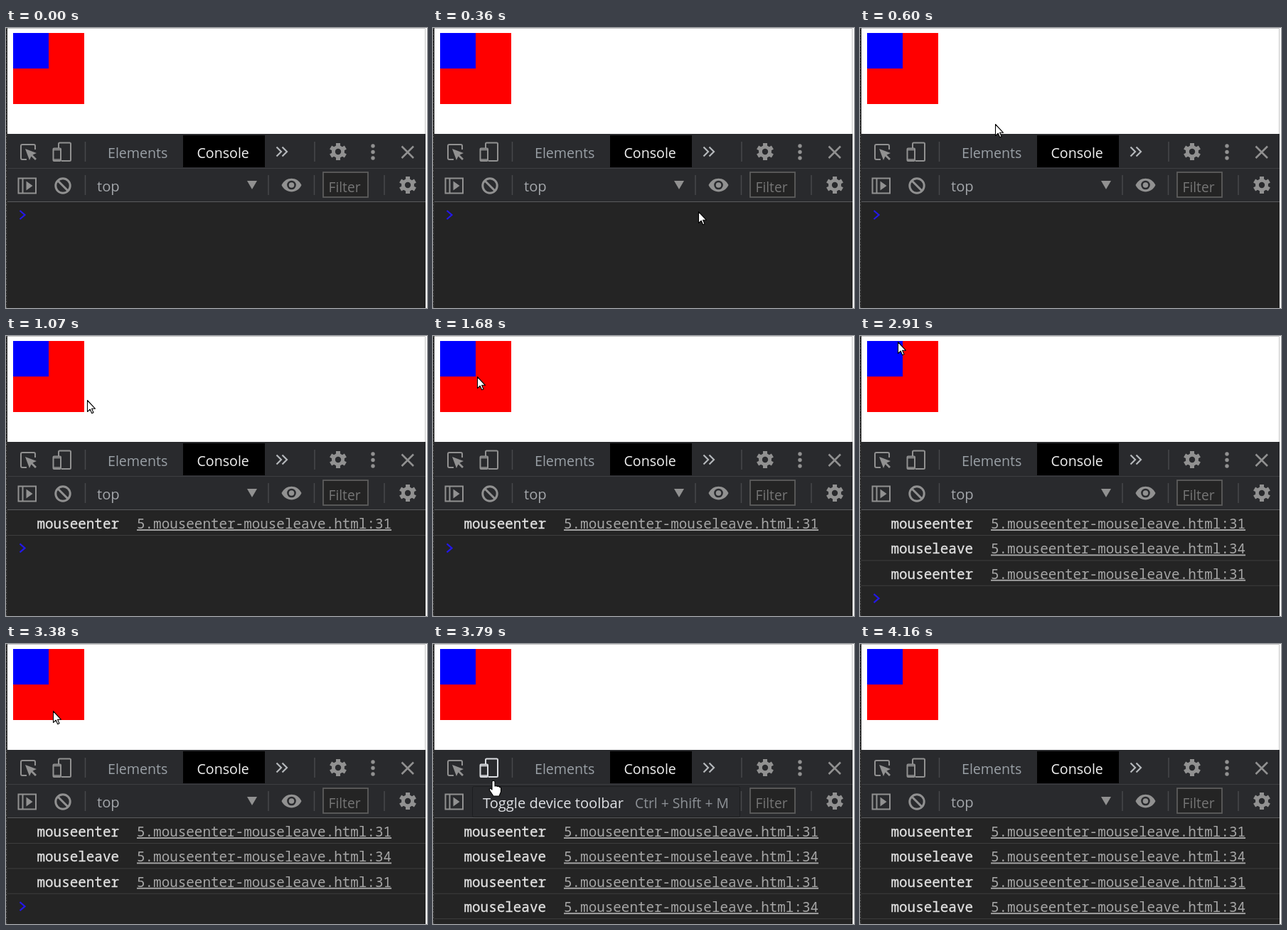
These frames come from a looping animation (592 px wide and 394 px high, 4.79 s). An HTML page:

```html
<!DOCTYPE html>
<html lang="en">
<head>
<meta charset="utf-8">
<title>mouseenter and mouseleave</title>
<style>
  html, body { margin: 0; width: 100%; height: 100%; overflow: hidden; background: #fff; }
  svg { display: block; }
  text { font: 19.6px "Open Sans", "Noto Sans", sans-serif; white-space: pre; }
  .log text { font: 19.25px "Noto Sans Mono", "DejaVu Sans Mono", monospace; }
  .line { fill: none; stroke: #919191; stroke-width: 2; }
  .solid { fill: #919191; }
  .sep { stroke: #47484b; stroke-width: 1.5; }
  .pointer { fill: #fff; stroke: #000; stroke-width: 1.1; stroke-linejoin: round; }
</style>
</head>
<body>
<svg width="592" height="394" viewBox="0 0 592 394">
  <defs>
    <g id="gear">
      <path d="M0-12V12M-10.4-6 10.4 6M-10.4 6 10.4-6" stroke="#919191" stroke-width="6"/>
      <circle r="9" class="solid"/>
      <circle r="4.2" fill="#292a2d"/>
    </g>
  </defs>

  <!-- page -->
  <path d="M1 0V394" stroke="#2b2b2b" stroke-width="2"/>
  <path d="M.5 0V394" stroke="#555" stroke-dasharray="2 3 1 2"/>
  <path d="M2 .5H589.5V149" fill="none" stroke="#c4c4c4"/>
  <rect x="10" y="7" width="100" height="100" fill="#f00"/>
  <rect x="10" y="7" width="50" height="50" fill="#00f"/>

  <!-- panel -->
  <rect x="2" y="149" width="588" height="245" fill="#242424"/>
  <rect x="2" y="149" width="588" height="95" fill="#292a2d"/>
  <path d="M2 197.5H590" stroke="#3d3e41"/>
  <path d="M2 244.5H590" stroke="#5a5b5d"/>
  <path class="sep" d="M111.5 160V188M434 160V188M111.5 207V235M369 207V235M433.5 207V235M532 207V235"/>

  <!-- tabs -->
  <path class="line" d="M29 185H23Q21 185 21 183V166Q21 164 23 164H39Q41 164 41 166V171"/>
  <path class="solid" d="M27 170 43 176 37.500 178.500 43 184 41 186 35.500 180.500 33 186Z"/>
  <g id="device" class="line">
    <path d="M74 169V163Q74 161.500 75.500 161.500H89.500Q91 161.500 91 163V185.500Q91 187 89.500 187H78"/>
    <rect x="66.500" y="169.500" width="10.500" height="17.500" rx="1"/>
    <path d="M67 171.500H77M67 185H77" stroke-width="1.500"/>
  </g>
  <text x="143" y="183" fill="#9aa0a6">Elements</text>
  <rect x="249" y="151" width="115" height="45"/>
  <text x="268.500" y="183" fill="#f1f1f1">Console</text>
  <path d="M380.500 167.500 387 174 380.500 180.500M388.500 167.500 395 174 388.500 180.500" fill="none" stroke="#b5b8bb" stroke-width="2.200"/>
  <use href="#gear" x="467" y="174"/>
  <g class="solid">
    <circle cx="516" cy="166" r="2.700"/><circle cx="516" cy="174.500" r="2.700"/><circle cx="516" cy="183" r="2.700"/>
  </g>
  <path class="line" d="M556.500 166.500 573 183M573 166.500 556.500 183" style="stroke-width:2.500"/>

  <!-- console toolbar -->
  <path class="line" d="M17.500 211.500H42V232.500H17.500ZM23.500 211.500V232.500"/>
  <path class="solid" d="M28.500 215.500 37.500 222 28.500 228.500Z"/>
  <path class="line" d="M90.200 222A10.200 10.200 0 1 1 69.800 222A10.200 10.200 0 1 1 90.200 222ZM73 215 87 229" style="stroke-width:3"/>
  <text x="128" y="230" fill="#a3a6aa" style="font-size:20.200px">top</text>
  <path class="solid" d="M339 215H353L346 227Z"/>
  <path class="solid" d="M387.500 221C393 208.500 410 208.500 415.500 221C410 233.500 393 233.500 387.500 221Z"/>
  <circle cx="401.500" cy="221" r="6.300" fill="#292a2d"/>
  <circle cx="401.500" cy="221" r="3.800" class="solid"/>
  <rect x="446" y="203" width="63" height="35" fill="#242424" stroke="#5c5c5c" stroke-width="1.800"/>
  <text x="453.500" y="231" fill="#757575" style="font-size:19.200px">Filter</text>
  <use href="#gear" x="565" y="221"/>

  <g id="logs"></g>
  <path id="prompt" d="M19.500 257 26.500 263 19.500 269" fill="none" stroke="#2418e8" stroke-width="2.200"/>

  <g id="tooltip">
    <rect x="55.500" y="200.500" width="376" height="43" rx="2" fill="#292a2d" stroke="#1d1e20"/>
    <text x="70" y="231" fill="#dfe1e5" style="font-size:20.100px">Toggle device toolbar</text>
    <text x="284" y="231" fill="#8d9196" style="font-size:19.300px">Ctrl + Shift + M</text>
  </g>
  <g id="cursor" class="pointer">
    <path id="arrow" d="M.5.5V16.500L4.200 13.200 6.700 18.800 9 17.800 6.600 12.300H11.500Z"/>
    <path id="hand" d="M-2 1.500Q0-1 2 1.500V8Q4.500 7 5.500 8.500Q7.500 7.500 8.500 9.500Q10.500 9 10.500 11.500V16L8 22H0L-5 14.500Q-6.500 11.500-4 11L-2 13Z"/>
  </g>
</svg>
<script>
const DURATION = 4790, ROW = 35.4;
const $ = id => document.getElementById(id);
const show = (el, on) => { el.style.display = on ? "" : "none"; };

// Bursts of screen updates: start, end, number of steps
const bursts = [[130, 600, 7], [680, 1140, 7], [1220, 1300, 2], [1530, 1990, 7], [2070, 2140, 2],
  [2300, 2530, 4], [2910, 3380, 7], [3460, 3930, 7], [4020, 4160, 3]];

// Pointer path: time, x, y
const path = [[130, 556, 380], [600, 190, 135], [1140, 101, 82], [1300, 80, 66], [1530, 74, 63],
  [1687, 62, 57], [1840, 45, 30], [1990, 43, 34], [2140, 42, 34], [2300, 40, 31], [2453, 52, 8],
  [2910, 53, 8], [3380, 66, 94], [3460, 69, 112], [3617, 80, 170], [3773, 85, 192],
  [3930, 57, 258], [4090, 270, 375]];

const events = [[1060, "enter"], [2530, "leave"], [2910, "enter"], [3460, "leave"]];

$("logs").innerHTML = events.map(([, kind], i) => `
  <g class="log" transform="translate(0 ${i * ROW})">
    <text x="43.500" y="271" fill="#e3e3e3" stroke="#e3e3e3" stroke-width=".3">mouse${kind}</text>
    <text x="184" y="271" fill="#a6a6a6" text-decoration="underline">5.mouseenter-mouseleave.html:${kind === "enter" ? 31 : 34}</text>
    <path d="M2 280.500H590" stroke="#3d3d3d"/>
  </g>`).join("");
const rows = [...$("logs").children];

function snap(t) {
  const burst = bursts.filter(b => b[0] <= t).pop();
  if (!burst) return 0;
  const [start, end, count] = burst, step = (end - start) / (count - 1);
  return Math.min(end, start + step * Math.floor((t - start) / step + 0.2));
}

function pointerAt(t) {
  const next = path.findIndex(p => p[0] > t);
  if (next < 0) return path[path.length - 1].slice(1);
  if (next === 0) return path[0].slice(1);
  const a = path[next - 1], b = path[next], k = (t - a[0]) / (b[0] - a[0]);
  return [1, 2].map(i => Math.round(a[i] + (b[i] - a[i]) * k));
}

function draw(now) {
  const t = snap(now % DURATION);
  const within = (from, to) => t >= from && t < to;
  const count = events.filter(e => e[0] <= t).length;

  rows.forEach((row, i) => show(row, i < count));
  $("prompt").setAttribute("transform", `translate(0 ${count * ROW})`);

  const hover = within(3610, 3850);
  $("device").style.stroke = hover ? "#dadce0" : "";
  show($("tooltip"), within(3690, 3850));
  show($("hand"), hover);
  show($("arrow"), !hover);
  show($("cursor"), within(130, 2530) || within(2910, 4160));
  $("cursor").setAttribute("transform", `translate(${pointerAt(t)})`);
}

const begin = performance.now();
function tick() {
  draw(performance.now() - begin);
  requestAnimationFrame(tick);
}
tick();
</script>
</body>
</html>
```
